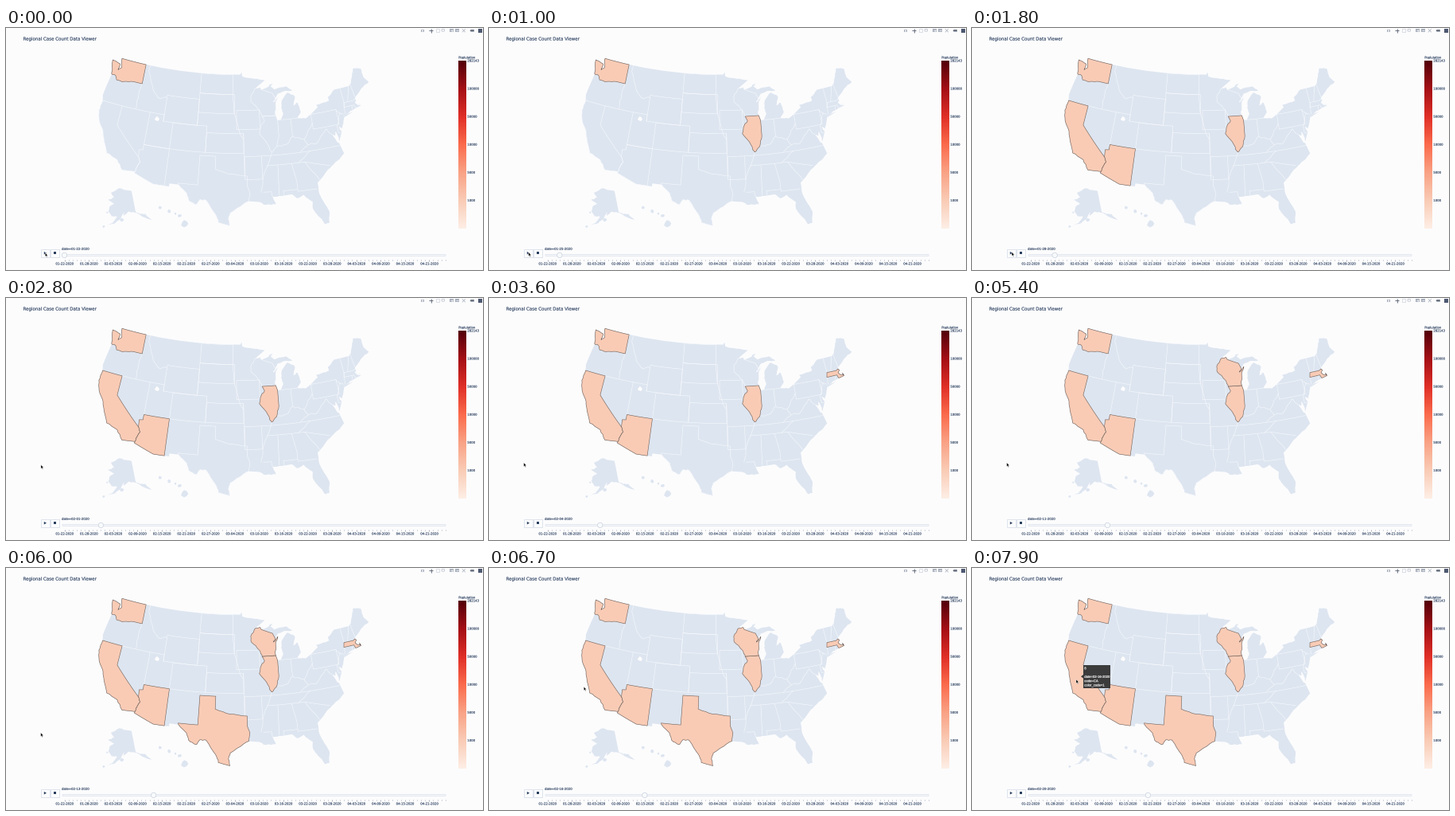
A matplotlib script for the animation above (8000 ms loop, 600 by 304 pixels).

```python
import numpy as np
import matplotlib.pyplot as plt
from matplotlib.animation import FuncAnimation
from matplotlib.colors import LinearSegmentedColormap
from matplotlib.patches import Circle, FancyBboxPatch, PathPatch, Polygon, Rectangle
from matplotlib.path import Path
from matplotlib.textpath import TextPath

W, H, DPI = 600, 304, 100
PT = 72 / DPI
PAPER, LAND, INK, CASE, BORDER = "#fcfcfd", "#dde5f0", "#2a3f5f", "#f9cbb5", "#f7f9fc"
STEP_MS, LOOP_MS, DAY_MS = 100, 8000, 260

fig = plt.figure(figsize=(W / DPI, H / DPI), dpi=DPI, facecolor=PAPER)
ax = fig.add_axes([0, 0, 1, 1])
ax.axis("off")
rng = np.random.default_rng(4)


# ---------- geography (longitude, latitude) ----------
def coast(*pts, steps=4, wobble=.05):
    """Key points joined by slightly ragged shoreline."""
    pts = np.array(pts, float)
    k = np.arange((len(pts) - 1) * steps + 1)
    fine = np.column_stack([np.interp(k / steps, range(len(pts)), col) for col in pts.T])
    fine[k % steps > 0] += rng.normal(0, wobble, fine[k % steps > 0].shape)
    return [tuple(p) for p in fine]


def island(lon, lat, radius):
    angle = np.arange(7) * 2 * np.pi / 7
    r = radius * rng.uniform(.7, 1.1, 7)
    return np.column_stack([lon + r * np.cos(angle) / np.cos(np.radians(lat)), lat + r * np.sin(angle)])


CALIFORNIA = coast((-117.12, 32.53), (-118.4, 33.9), (-120.6, 34.5), (-121.9, 36.6), (-122.5, 37.7),
                   (-123.7, 38.9), (-124.35, 40.4), (-124.2, 42))
OREGON = coast((-124.5, 42.85), (-124, 46.2))
PUGET = coast((-124.1, 46.5), (-124.7, 48.38), (-122.8, 48.1), (-122.9, 47.15), (-122.3, 47.7), (-122.76, 49))
MINNESOTA = coast((-95.15, 49), (-94.82, 49.3), (-94.6, 48.7), (-92, 48.3), (-89.6, 48), (-92, 46.7))
SUPERIOR = coast((-92, 46.7), (-90.8, 46.95), (-90.4, 46.57))
UPPER_MICHIGAN = coast((-89.2, 46.85), (-87.9, 47.47), (-88.4, 46.9), (-87.4, 46.5), (-84.95, 46.75),
                       (-83.7, 46), (-85.5, 46.08), (-87, 45.75))
WISCONSIN = coast((-87.6, 45.1), (-88, 44.55), (-87, 45.3), (-87.6, 44.3), (-87.8, 42.49))
LAKES = coast((-87.5, 41.7), (-86.8, 41.76), (-86.2, 42.6), (-86.5, 43.6), (-86.2, 44.7), (-84.75, 45.78),
              (-83.3, 45), (-83.9, 43.7), (-82.95, 44.07), (-82.5, 42.6), (-83.45, 41.73), (-81.7, 41.5),
              (-78.9, 42.85), (-79.05, 43.27), (-76.2, 43.55), (-76.3, 44.1), (-74.7, 45))
MAINE = coast((-71.5, 45), (-70.85, 45.25), (-70, 46.7), (-69.24, 47.45), (-67.8, 47.07), (-67.8, 45.7),
              (-66.97, 44.8), (-69, 44.1), (-70.7, 43.1))
CAPE_COD = [(-70.82, 42.87), (-70.6, 42.65), (-71, 42.3), (-70.55, 41.85), (-70.05, 41.8),
            (-70.15, 42.05), (-69.95, 41.65), (-70.65, 41.55), (-71.15, 41.5)]
CHESAPEAKE = coast((-71.86, 41.32), (-73.9, 40.8), (-74, 40.4), (-74.9, 38.94), (-75.5, 39.5),
                   (-75.05, 38.45), (-75.95, 37.15), (-76.1, 39.4), (-76.4, 38.2), (-77, 38.4), (-76, 36.9))
FLORIDA = coast((-75.5, 35.25), (-77.9, 33.9), (-79.2, 33.2), (-81.3, 31.6), (-81.3, 29.9), (-80.05, 26.9),
                (-80.4, 25.2), (-81.2, 25.2), (-82.8, 27.8), (-82.65, 28.8), (-84.1, 30.08),
                (-85.2, 29.65), (-86.2, 30.35))
LOUISIANA = coast((-88, 30.25), (-89.6, 30.2), (-89.1, 29.05), (-90.9, 29.05), (-92, 29.55))
TEXAS = coast((-93.85, 29.7), (-94.7, 29.35), (-97.1, 27.9), (-97.4, 27), (-97.15, 25.95), (-99.1, 26.4),
              (-99.6, 27.6), (-101.4, 29.77), (-102.5, 29.75), (-103.1, 28.98), (-104.5, 29.6),
              (-104.9, 30.57), (-106.53, 31.78))
SONORA = [(-109.05, 31.33), (-111.07, 31.33), (-114.81, 32.5), (-114.72, 32.72)]
COLORADO_RIVER = coast((-114.72, 32.72), (-114.5, 33.7), (-114.15, 34.3), (-114.63, 35), wobble=.03)

MAINLAND = (CALIFORNIA + OREGON + PUGET + MINNESOTA + SUPERIOR + UPPER_MICHIGAN + WISCONSIN + LAKES
            + MAINE + CAPE_COD + CHESAPEAKE + FLORIDA + LOUISIANA + TEXAS
            + [(-108.2, 31.78), (-108.2, 31.33)] + SONORA)
LONG_ISLAND = [(-74, 40.6), (-73.7, 40.88), (-71.9, 41.07), (-73.9, 40.57)]
ALASKA = coast((-141, 69.65), (-149, 70.5), (-156.5, 71.3), (-166.2, 68.9), (-161.8, 66.9), (-168, 65.6),
               (-161, 64.4), (-164.6, 63.1), (-165.5, 60.8), (-162, 58.8), (-157.4, 58.8), (-160.5, 56),
               (-164.8, 54.6), (-158.5, 56), (-154, 58.4), (-151.5, 60.8), (-151.8, 59.3), (-147, 60.9),
               (-139.8, 59.6), (-135.5, 57.3), (-130.1, 55), (-133.4, 58.4), (-137.5, 58.9), (-141, 60.3),
               wobble=.12)

# code: (first day with cases, outline)
STATES = {
    "WA": (0, PUGET + [(-117.03, 49), (-116.95, 46), (-119, 46)]
           + coast((-119, 46), (-121, 45.65), (-122.6, 45.6), (-123.1, 46.2), (-124.05, 46.3))),
    "IL": (2, [(-90.64, 42.5), (-87.8, 42.49), (-87.5, 41.7)]
           + coast((-87.53, 39.35), (-88.1, 37.8), (-89.15, 37), (-90.1, 38.6), (-91.4, 39.9),
                   (-91.1, 40.9), (-90.2, 41.8))),
    "CA": (4, CALIFORNIA + [(-120, 42), (-120, 39)] + COLORADO_RIVER[::-1]),
    "AZ": (4, SONORA + COLORADO_RIVER + [(-114.75, 36.1), (-114.05, 36.2), (-114.05, 37), (-109.05, 37)]),
    "MA": (10, CAPE_COD + [(-71.38, 42.02), (-73.5, 42.05), (-73.26, 42.75), (-71.3, 42.7)]),
    "WI": (14, SUPERIOR + [(-88.1, 45.9)] + WISCONSIN
           + coast((-90.64, 42.5), (-91.2, 43.5), (-92.8, 44.75), (-92.9, 45.6), (-92.3, 46.2))),
    "TX": (22, TEXAS + [(-106.62, 32), (-103.05, 32), (-103.05, 36.5), (-100, 36.5), (-100, 34.56)]
           + coast((-100, 34.56), (-97.2, 33.85), (-94.04, 33.55)) + [(-94.04, 32), (-93.6, 31)]),
}


def frame(west, south, east, north):
    return [(west, south), (west, north), (east, north), (east, south), (west, south)]


# The Dakotas, Wyoming, Colorado, Kansas, Iowa, Arkansas, Pennsylvania
BOXES = [frame(-104.05, 45.94, -96.8, 49), frame(-104.05, 43, -96.45, 45.94), frame(-111.05, 41, -104.05, 45),
         frame(-109.05, 37, -102.05, 41), frame(-102.05, 37, -94.6, 40), frame(-96, 40.6, -91.2, 43.5),
         frame(-94.45, 33, -91.2, 36.5), frame(-80.52, 39.72, -75.2, 42)]
STRAIGHT = [
    [(-120, 42), (-111.05, 42)], [(-114.05, 42), (-114.05, 37), (-109, 37)], [(-111.05, 42), (-111.05, 41)],
    [(-117.03, 49), (-117, 46)], [(-104.05, 43), (-104.05, 41)], [(-94.6, 40), (-94.5, 33.6)],
    [(-91.2, 36.5), (-89.5, 36.5), (-75.9, 36.55)], [(-90.3, 35), (-83.1, 35), (-78.55, 33.86)],
    [(-88.2, 35), (-88.4, 30.4)], [(-85.6, 35), (-85, 32.2), (-85, 30.7)], [(-87.5, 30.3), (-87.6, 31), (-85, 31)],
    [(-85, 30.7), (-81.45, 30.7)], [(-84.8, 39.1), (-84.8, 41.7)], [(-86.8, 41.76), (-83.45, 41.73)],
    [(-91.2, 31), (-89.75, 31), (-89.6, 30.2)], [(-73.35, 45), (-73.25, 42.75), (-73.6, 41)],
    [(-71.5, 45), (-72.45, 42.72)], [(-71.05, 45.3), (-70.7, 43.1)], [(-71.8, 42), (-71.86, 41.3)],
    [(-75.7, 39.7), (-75.7, 38.46), (-75.05, 38.45)],
]
RIVERS = [coast(*pts, wobble=.08) for pts in (
    [(-116.95, 46), (-117.2, 44.4), (-117.03, 42)],
    [(-116.05, 49), (-116.05, 48), (-114.35, 45.5), (-113, 44.45), (-111.05, 44.5)],
    [(-96.8, 45.9), (-96.45, 43), (-95.3, 40), (-94.6, 39.1)],
    [(-89.15, 37), (-90.1, 35), (-91.15, 33), (-91.6, 31)],
    [(-83.1, 35), (-80.85, 32.03)],
    [(-84.3, 35), (-81.7, 36.6)],
    [(-88.1, 37.8), (-86, 38), (-84.8, 39.1), (-82.6, 38.4), (-80.52, 40.64)],
    [(-83.68, 36.6), (-82, 37.5), (-82.6, 38.4)],
    [(-82, 37.5), (-80.3, 37.5), (-78, 39.4), (-77, 38.4)],
    [(-75.35, 42), (-74.7, 41.36), (-75.1, 40.4), (-75.5, 39.75)],
    [(-74.7, 41.36), (-73.95, 41)],
)]


def conic(rot, parallels, centre, scale, at):
    """Make an equal-area conic projection to stage pixels."""
    s1, s2 = np.sin(np.radians(parallels))
    n = (s1 + s2) / 2

    def raw(lon, lat):
        rho = np.sqrt(1 + s1 * s2 - 2 * n * np.sin(np.radians(lat))) / n
        angle = n * np.radians(lon - rot)
        return np.array([rho * np.sin(angle), rho * np.cos(angle)])

    def project(pts):
        pts = np.array(pts, float)
        k = np.linspace(0, len(pts) - 1, (len(pts) - 1) * 6 + 1)
        lon, lat = (np.interp(k, range(len(pts)), col) for col in pts.T)
        return (raw(lon, lat).T - raw(*centre)) * scale + at

    return project


SCALE, MX, MY = 470.5, 286.2, 143.4
lower48 = conic(-96, (29.5, 45.5), (-96.6, 38.7), SCALE, (MX, MY))
alaska = conic(-154, (55, 65), (-156, 58.5), SCALE * .35, (MX - .307 * SCALE, MY + .201 * SCALE))
hawaii = conic(-157, (8, 18), (-160, 19.9), SCALE, (MX - .205 * SCALE, MY + .212 * SCALE))


# ---------- drawing helpers ----------
def add(patch):
    return ax.add_patch(patch)


def shape(xy, fc, ec="none", lw=0.0, z=1):
    return add(Polygon(xy, closed=True, fc=fc, ec=ec, lw=lw * PT, zorder=z, joinstyle="round"))


def line(xs, ys, color, lw, z=2):
    return ax.plot(xs, ys, color=color, lw=lw * PT, zorder=z, solid_capstyle="butt")[0]


def box(x, y, w, h, fc, ec="none", lw=0.0, z=3):
    return add(Rectangle((x, y), w, h, fc=fc, ec=ec, lw=lw * PT, zorder=z))


def pill(x, y, w, h, pad, fc, ec, lw):
    return add(FancyBboxPatch((x, y), w, h, boxstyle=f"round,pad={pad}", fc=fc, ec=ec, lw=lw * PT, zorder=3))


def text_path(x, y, s, size, centred=False, family="DejaVu Sans"):
    """Glyph outlines, vertically centred on y."""
    path = TextPath((0, 0), s, size=size, prop={"family": family})
    shift = path.get_extents().width / 2 if centred else 0
    return Path(path.vertices * (1, -1) + (x - shift, y + .36 * size), path.codes)


def label(x, y, s, size=3.9, color=INK, z=4, **kw):
    return add(PathPatch(text_path(x, y, s, size, **kw), fc=color, ec=color, lw=.15 * PT, zorder=z))


def date(day):
    n = 22 + day
    for month, days in enumerate((31, 29, 31, 30), 1):
        if n <= days:
            return f"{month:02d}-{n:02d}-2020"
        n -= days


# ---------- map ----------
for project, outlines in (
        (lower48, [MAINLAND, LONG_ISLAND]),
        (alaska, [ALASKA, island(-153.4, 57.5, .9), island(-167, 53.8, .6), island(-166.3, 60.1, .5)]),
        (hawaii, [island(-155.45, 19.6, .6), island(-156.3, 20.8, .3), island(-157, 21.12, .2),
                  island(-158, 21.48, .3), island(-159.5, 22.05, .25)])):
    for pts in outlines:
        shape(project(pts), LAND)
for pts in BOXES + STRAIGHT + RIVERS:
    line(*lower48(pts).T, BORDER, .6)
cases = {}
for code, (_, pts) in STATES.items():
    xy = lower48(pts)
    shape(xy, "none", BORDER, .6, 2)
    cases[code] = shape(xy, CASE, "#6b5e58", .6, 3)
shape(lower48(island(-112.4, 41.2, .4)), PAPER, z=3)

label(21.5, 13.5, "Regional Case Count Data Viewer", 5.5)

# ---------- colour bar ----------
reds = LinearSegmentedColormap.from_list(
    "cases", ["#feeee5", CASE, "#f9a285", "#fb6b4c", "#e02f27", "#a51016", "#55000a"])
ax.imshow(np.linspace(1, 0, 256)[:, None], cmap=reds, extent=(569, 579, 252, 41), aspect="auto", zorder=2)
label(569.3, 37, "Poplulation", 3.8)
for i, value in enumerate((282143, 100000, 50000, 10000, 5000, 1000)):
    label(580.3, 41 + 35.1 * i, str(value), 3.85)

# ---------- toolbar ----------
PALE, GREY, DARK = "#c6cbd4", "#a9b0bc", "#6a7382"
tools = [
    box(521.7, 2, 4.6, 3.2, GREY), add(Circle((524, 3.6), 1, fc=PAPER, zorder=4)),
    line([532.2, 536.8], [3.3, 3.3], DARK, 1), line([534.5, 534.5], [1, 5.6], DARK, 1),
    box(540.5, 1.3, 4, 4, "none", PALE, .6), pill(548.7, 2.2, 2.2, 1.2, .7, "none", GREY, .6),
    line([573.8, 577.8], [1.3, 5.3], GREY, .7), line([573.8, 577.8], [5.3, 1.3], GREY, .7),
    line([560.5, 560.5], [2, 4.6], PAPER, .7, 4),
    shape([(583.5, 3.3), (584.7, 2), (588.8, 2), (588.8, 4.6), (584.7, 4.6)], DARK, z=3),
    box(594, 1, 4.6, 4.6, "#4d5870"),
]
for x in (560.5, 567.5):
    tools += [box(x - 2.1, 1.2, 4.2, 4.2, GREY), line([x - 1.3, x + 1.3], [3.3, 3.3], PAPER, .7, 4)]

# ---------- buttons and slider ----------
for x in (44, 55.6):
    box(x, 277.7, 11.2, 10.4, "#fbfcfd", "#cdd5e1", .6)
shape([(47.8, 280.9), (47.8, 284.5), (51, 282.7)], INK, z=4)
box(60.2, 281.4, 2.4, 2.4, INK, z=4)

X0, PITCH, RAIL_Y = 73.5, 5.098, 285.4
pill(71.5, RAIL_Y - .6, 481, 1.2, .5, "#f6f8fb", "#d0d8e4", .5)
for day in range(95):
    x = X0 + PITCH * day
    major = day % 6 == 0
    line([x, x], [290.5, 292.5 if major else 291.6], "#59677f", .5, 3)
    if major:
        label(x, 296, date(day), centred=True)
knob = add(Circle((X0, RAIL_Y), 3.2, fc="#f8fafc", ec="#c3ccd9", lw=.6 * PT, zorder=5))
date_text = label(70, 277.4, "date=" + date(0))

# ---------- hover label and pointer ----------
hover = [box(140, 122.3, 34, 28.2, "#3b3b3b", z=6),
         shape([(137, 136.3), (140, 134), (140, 138.6)], "#3b3b3b", z=6)]
for row, s in enumerate(("8", "", "date=02-16-2020", "code=CA", "color_code=1")):
    if s:
        hover.append(label(141.3, 125.8 + 5.3 * row, s, 4.2, "white", 7, family="Liberation Sans"))

ARROW = np.array([(0, 0), (0, 4.8), (1.1, 3.8), (1.9, 5.6), (2.7, 5.2), (1.9, 3.5), (3.4, 3.4)])
pointer = shape(ARROW, "black", "white", .35, 9)
# (start ms, end ms, from, to) of each pointer move
MOVES = [(0, 1800, (49.3, 282.4), (50, 281.5)), (2000, 2900, (50, 281.5), (43.7, 207)),
         (6200, 6850, (43.7, 207), (131, 140))]


def ease(t, start, end):
    u = np.clip((t - start) / (end - start), 0, 1)
    return u * u * (3 - 2 * u)


def pointer_at(t):
    pos = np.array(MOVES[0][2])
    for start, end, a, b in MOVES:
        pos = pos + ease(t, start, end) * np.subtract(b, a)
    return pos


def day_at(ms):
    return max(0, int((ms - 170) // DAY_MS))


def update(i):
    t = i * STEP_MS
    shown = day_at(t - 50)  # knob and map follow the date text slightly late
    date_text.set_path(text_path(70, 277.4, "date=" + date(day_at(t)), 3.9))
    knob.center = (X0 + PITCH * shown, RAIL_Y)
    for code, patch in cases.items():
        patch.set_visible(shown >= STATES[code][0])
    for artist in hover:
        artist.set_visible(t >= 6900)
    for artist in tools:
        artist.set_visible(not 3400 <= t < 3900)
    pointer.set_xy(ARROW + pointer_at(t))
    return []


ax.set_xlim(0, W)
ax.set_ylim(H, 0)
anim = FuncAnimation(fig, update, frames=LOOP_MS // STEP_MS, interval=STEP_MS, repeat=True,
                     repeat_delay=0, blit=False)
plt.show()
```
